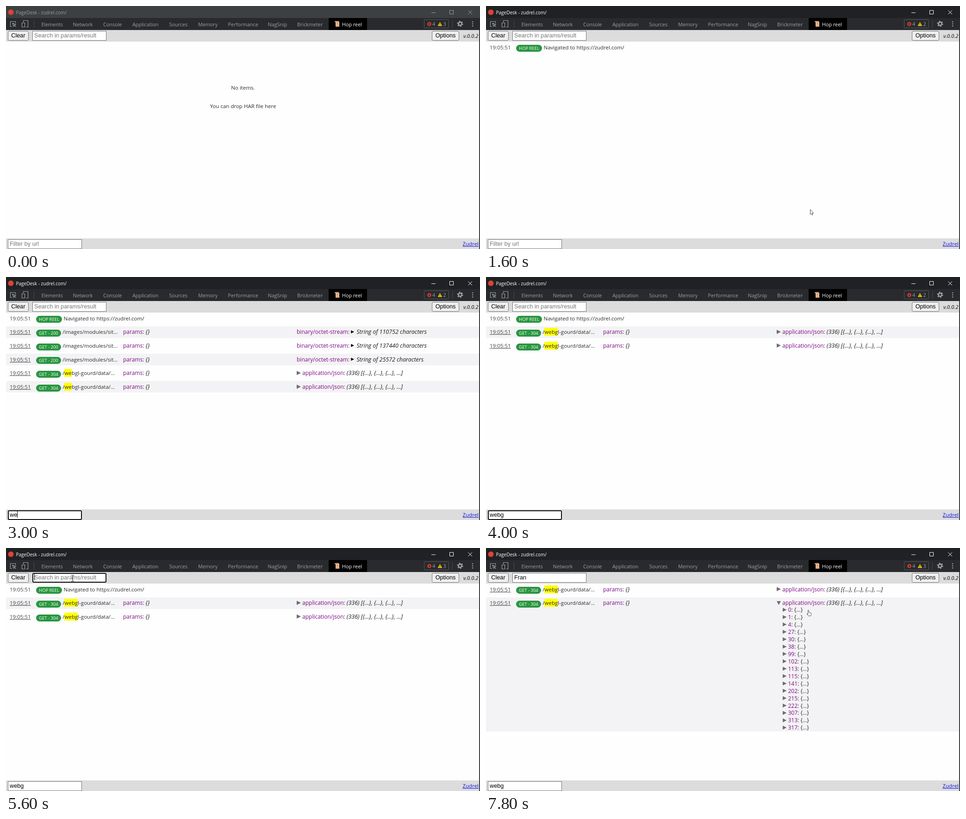
Recreate the animation shown at these times as an HTML page. Size 1024 px wide and 526 px high, loop 8 s.

```html
<!DOCTYPE html>
<html lang="en">
<head>
<meta charset="utf-8">
<title>Request log panel</title>
<style>
html, body { margin: 0; width: 100%; height: 100%; overflow: hidden; background: #fff; }
#stage { position: relative; width: 1024px; height: 526px; overflow: hidden; background: #fefefe;
  font: 11.5px/20px "Open Sans", "Noto Sans", sans-serif; color: #2b2b2b; white-space: nowrap; }
#stage div, #stage > svg { position: absolute; }
#log, #pointer { left: 0; top: 0; }
#log { width: 1024px; height: 503px; }
#title { left: 0; top: 0; width: 1024px; height: 26px; background: #3c4043; color: #9a9da1; font-size: 10px; }
#title.active { background: #202124; color: #fff; }
#title svg { position: absolute; left: 0; top: 0; fill: none; stroke: currentColor; }
#tabs { left: 0; top: 26px; width: 1024px; height: 26px; background: #292a2d; color: #9aa0a6; font-size: 10.8px; }
#tabs svg { position: absolute; left: 0; top: 0; }
#tabs .on { left: 697px; top: 0; width: 83px; height: 26px; background: #000; }
.bar { left: 0; width: 1024px; background: #dcdcdd; }
.ui { box-sizing: border-box; font: 12.7px/18px "Liberation Sans", Arial, sans-serif; }
.button { top: 54px; height: 21px; border: 1px solid #767676; border-radius: 3px; background: #efefef;
  color: #000; text-align: center; line-height: 19px; }
.field { width: 160px; height: 21px; padding-left: 3px; border: 1px solid #767676; background: #fff;
  color: #000; line-height: 19px; }
.field.focus { border: 2px solid #101010; border-radius: 3px; padding-left: 2px; line-height: 17px; }
.field .hint { color: #757575; }
.caret { display: inline-block; width: 1px; height: 14px; margin-right: -1px; vertical-align: -2px; background: #000; }
.row { left: 0; width: 1022px; }
.row.alt { background: #f3f2f4; }
.time { left: 8px; top: 2.5px; color: #444; }
.time.link { text-decoration: underline; }
.url { left: 65px; top: 2.5px; }
.url mark { padding: 1px 0; background: #ff0; color: inherit; }
.pill { display: inline-block; position: relative; top: 1.5px; height: 15px; padding: 0 6px; margin-right: 3.5px;
  border-radius: 8px; background: #28963f; color: #fff; font-size: 9.5px; line-height: 15px; vertical-align: middle; }
.pill.bad { background: #bd2130; }
.cell { top: 2.5px; font-size: 12px; font-weight: 500; }
.cell i { font-size: 12.5px; color: #1c1c1c; }
.key { color: #7d0c86; }
.dim { color: #7a7a7a; }
.str { color: #c41a16; }
.tri { display: inline-block; width: 9px; height: 9px; margin-right: 3px; background: #6e6e6e;
  clip-path: polygon(0 0, 100% 50%, 0 100%); }
.tri.open { clip-path: polygon(0 8%, 100% 8%, 50% 100%); }
.tri.dark { width: 7px; height: 7px; margin: 0 5px 1px 3px; background: #111; }
.picture { position: relative; top: 3px; }
.thumb { display: inline-block; box-sizing: border-box; width: 22px; height: 22px; margin-left: 7px;
  border: 1px dotted #aaa; vertical-align: middle; }
.thumb.photo { background: linear-gradient(120deg, #3c6450, #17212a 45%, #1c2730 75%, #2f8a55) content-box; padding: 1px; }
.message { left: 0; width: 1024px; text-align: center; }
#edge { left: 1022px; top: 52px; width: 2px; height: 474px; background: linear-gradient(90deg, #999, #222 50%); }
</style>
</head>
<body>
<div id="stage">
  <div id="title">
    <svg width="1024" height="26">
      <circle cx="10.5" cy="13.5" r="6" fill="#db4437" stroke="none"/>
      <path d="M919 14.5h9M958.5 9.5h8v8h-8zM998.5 9.5l8.5 8.5M1007 9.5l-8.5 8.5"/>
    </svg>
    <div style="left:21.5px;top:3.5px">PageDesk - zudrel.com/</div>
  </div>
  <div id="tabs">
    <div class="on"></div>
    <svg width="1024" height="26" fill="none" stroke="#9aa0a6">
      <path d="M13 18.5h-3.5v-11h11v4M14 11l7 3-3 1.2-1.3 3zM17.5 15l4 4M37.5 9v-3.5h10v14h-4" stroke-width="1.2"/>
      <path d="M34.5 10.5h6v9h-6z" stroke-width="1.2"/>
      <path d="M60.5 5v16M964.5 5v16" stroke="#4a4c50"/>
      <rect x="903.5" y="3.5" width="53" height="18" rx="1" stroke="#55585c"/>
      <circle cx="914.5" cy="13" r="4.3" fill="#e33b35" stroke="none"/>
      <path d="M912.8 11.3l3.4 3.4m0-3.4l-3.4 3.4" stroke="#292a2d" stroke-width="1.3"/>
      <path d="M937.5 8.5l4.8 8.8h-9.6z" fill="#f5c518" stroke="none"/>
      <path d="M937.5 11.5v3m0 1v1" stroke="#292a2d"/>
      <circle cx="981" cy="12.5" r="3.6" stroke-width="2.6"/>
      <circle cx="981" cy="12.5" r="5.7" stroke-width="2" stroke-dasharray="2.5 3.47"/>
      <g fill="#9aa0a6" stroke="none">
        <circle cx="1008" cy="8.3" r="1.3"/><circle cx="1008" cy="12.8" r="1.3"/><circle cx="1008" cy="17.3" r="1.3"/>
      </g>
      <g stroke="none">
        <path d="M712 8h8v10h-8z" fill="#f0c8a0"/>
        <path d="M710 8q0-1.5 2-1.5h7v2.5h-9zM712 16h8.5v1.5q0 1.5-2 1.5h-6.5z" fill="#d99a72"/>
        <path d="M713.5 11h5M713.5 13.5h5" stroke="#a8714f"/>
      </g>
    </svg>
    <div style="left:921px;top:3px">4</div>
    <div id="warnings" style="left:944.5px;top:3px"></div>
  </div>
  <div class="bar" style="top:52px;height:25px">
    <div style="right:3.5px;top:2.5px;color:#111"><i>v.0.0.2</i></div>
  </div>
  <div class="ui button" style="left:4px;width:45px">Clear</div>
  <div class="ui button" style="left:920px;width:59px">Options</div>
  <div id="search" class="ui field" style="left:57px;top:54px"></div>
  <div id="log"></div>
  <div class="bar" style="top:503px;height:23px">
    <div style="right:3px;top:1.5px;color:#1a1ae0;text-decoration:underline">Zudrel</div>
  </div>
  <div id="filter" class="ui field" style="left:4px;top:505px"></div>
  <div id="edge"></div>
  <svg id="pointer" width="18" height="20" fill="#fff" stroke="#555" stroke-linejoin="round"></svg>
</div>
<script>
const LOOP = 8000, STEP = 200, PITCH = 29.68;
const $ = id => document.getElementById(id);

const tri = '<span class="tri"></span>';
const key = name => `<span class="key">${name}</span>: `;
const empty = key('params') + '<i>{}</i>';
const params = body => tri + key('params') + `<i>{${body}}</i>`;
const dim = text => `<span class="dim">${text}</span>`;
const str = text => `<span class="str">"${text}"</span>`;
const chars = (type, n) =>
  `<span class="key">${type}/octet-stream</span>:<span class="tri dark"></span><i>String of ${n} characters</i>`;
const unknown = key('x-unknown') + dim('null');
const jsonList = key('application/json') + '<i>(336) [{…}, {…}, {…}, …]</i>';
const picture = (type, look) =>
  `<span class="picture">${key('image/' + type)}<span class="thumb ${look}"></span></span>`;

// status, visible path, params, result, plus the hidden rest of the path
const row = (status, path, args, result, rest = '') => ({ status, path, args, result, rest });
const asset = (n, rest, type = 'binary') =>
  row('GET - 200', '/images/modules/sit…', empty, chars(type, n), rest);
const stats = n => row('POST - 0', '/_private/browser/stats', params(`${dim('stats:')} Array(${n})`), unknown);
const model = () => row('GET - 304', '/webgl-gourd/data/…', empty, tri + jsonList);

const rows = [
  row('HOP REEL', 'Navigated to https://zudrel.com/', '', ''),
  asset(110752, '.webp'),
  row('GET - 200', '/mirkovolt', params(`${dim('v:')} ${str(4)}`), picture('jpeg', 'photo')),
  asset(137440, '.webp'),
  asset(25572, '.webp'),
  row('GET - 200', '/', empty, tri + '<span style="color:#000">#document</span>'),
  stats(1),
  row('GET - 200', 'image/gif;base64,R0l…', empty, picture('gif', '')),
  model(),
  model(),
  row('GET - 0', '/zudrel/page_view',
    params(`${dim('dimensions[page]:')} ${str('https://zudrel.com/')}…`), unknown),
  asset(5772, '', 'application'),
  stats(6),
];
rows[12].time = '19:05:52';

const indexes = [0, 1, 4, 27, 30, 38, 99, 102, 113, 115, 141, 202, 215, 222, 307, 313, 317];

// time, x, y, shape; the pointer jumps and is hidden where no place is given
const moves = [
  [0], [800, 930, 500, 'arrow'], [1000, 875, 460, 'arrow'], [1200, 836, 429, 'arrow'],
  [1600, 700, 440, 'arrow'], [1800, 430, 468, 'arrow'], [2000, 260, 476, 'arrow'],
  [2200, 175, 496, 'arrow'], [2400, 130, 508, 'beam'], [2800],
  [4800, 130, 470, 'arrow'], [5000, 148, 330, 'arrow'], [5200, 150, 170, 'arrow'],
  [5400, 140, 58, 'beam'], [5800],
  [7000, 430, 105, 'arrow'], [7200, 590, 116, 'arrow'], [7400, 632, 118, 'hand'], [7800, 692, 133, 'hand'],
];
const shapes = {
  arrow: '<path d="M.5.5v10.5l2.3-2 1.7 3.7 1.7-.8-1.7-3.5h3z"/>',
  beam: '<path d="M1 1h2.5m1 0H7M4 1v13M1 14h2.5m1 0H7" stroke="#222" fill="none"/>',
  hand: '<path d="M3.5 8V2q1-1.5 2 0v4.5l4.5 1q1 .5.8 2l-1 4.5h-5L1 10q.5-1.5 2.5.5z"/>',
};

const typed = (text, start, t) => text.slice(0, Math.max(0, Math.floor((t - start) / STEP) + 1));
const within = (t, from, to) => t >= from && t < to;

function drawField(id, text, hint, focus, caret) {
  const bar = focus && caret ? '<span class="caret"></span>' : '';
  $(id).classList.toggle('focus', focus);
  $(id).innerHTML = text ? text + bar : bar + `<span class="hint">${hint}</span>`;
}

function drawRow(r, i, filter, left, open) {
  const first = r === rows[0];
  const path = filter && !first ? r.path.replace(filter, '<mark>$&</mark>') : r.path;
  const items = open ? indexes.map((n, k) =>
    `<div class="cell" style="left:${left + 12.5}px;top:${17.5 + k * 15.95}px">${tri}${key(n)}{…}</div>`).join('') : '';
  const result = open ? r.result.replace('"tri"', '"tri open"') : r.result;
  const pill = r.status.endsWith('- 0') ? 'pill bad' : 'pill';
  return `<div class="row ${i % 2 ? 'alt' : ''}" style="top:${77 + i * PITCH}px;height:${open ? 290 : 25}px">
    <div class="time ${first ? '' : 'link'}">${r.time || '19:05:51'}</div>
    <div class="url"><span class="${pill}">${r.status}</span>${path}</div>
    <div class="cell" style="left:253px">${r.args}</div>
    <div class="cell" style="left:${left}px">${result}</div>${items}</div>`;
}

function drawLog(t, filter, search) {
  if (t < 1600) {
    return '<div class="message" style="top:166.5px">No items.</div>' +
      '<div class="message" style="top:206.5px">You can drop HAR file here</div>';
  }
  const loaded = t < 1800 ? 1 : t < 2000 ? 7 : rows.length;
  const shown = rows.slice(0, loaded).filter(r =>
    r === rows[0] ? !search : (r.path + r.rest).includes(filter));
  const left = filter.length > 1 ? 628 : 640.5;
  return shown.map((r, i) => drawRow(r, i, filter, left, t >= 7600 && i === 1)).join('');
}

function draw(t) {
  const filter = typed('webg', 2800, t), search = typed('Fran', 5800, t);
  $('title').classList.toggle('active', t >= 1000);
  $('warnings').textContent = within(t, 1600, 5000) ? 2 : 3;
  drawField('filter', filter, 'Filter by url', within(t, 2600, 5600), !within(t, 4000, 4600));
  drawField('search', search, 'Search in params/result', within(t, 5600, 7600), t < 7000);
  $('log').innerHTML = drawLog(t, filter, search);

  const [, x = 0, y = 0, shape] = moves.findLast(m => m[0] <= t);
  $('pointer').innerHTML = shapes[shape] || '';
  $('pointer').style.transform = `translate(${x}px, ${y}px)`;
}

['Elements', 'Network', 'Console', 'Application', 'Sources', 'Memory', 'Performance', 'NagSnip', 'Brickmeter', 'Hop reel']
  .forEach((name, i) => {
    const tab = document.createElement('div');
    tab.textContent = name;
    tab.style.left = [76.5, 144.5, 210, 273, 352.5, 415, 479.5, 565.5, 629, 726][i] + 'px';
    tab.style.top = '3.5px';
    if (i === 9) tab.style.color = '#fff';
    $('tabs').append(tab);
  });

let last = -1;
const start = performance.now();
function tick() {
  const t = Math.floor((performance.now() - start) % LOOP / STEP) * STEP;
  if (t !== last) draw(last = t);
  requestAnimationFrame(tick);
}
tick();
</script>
</body>
</html>
```
